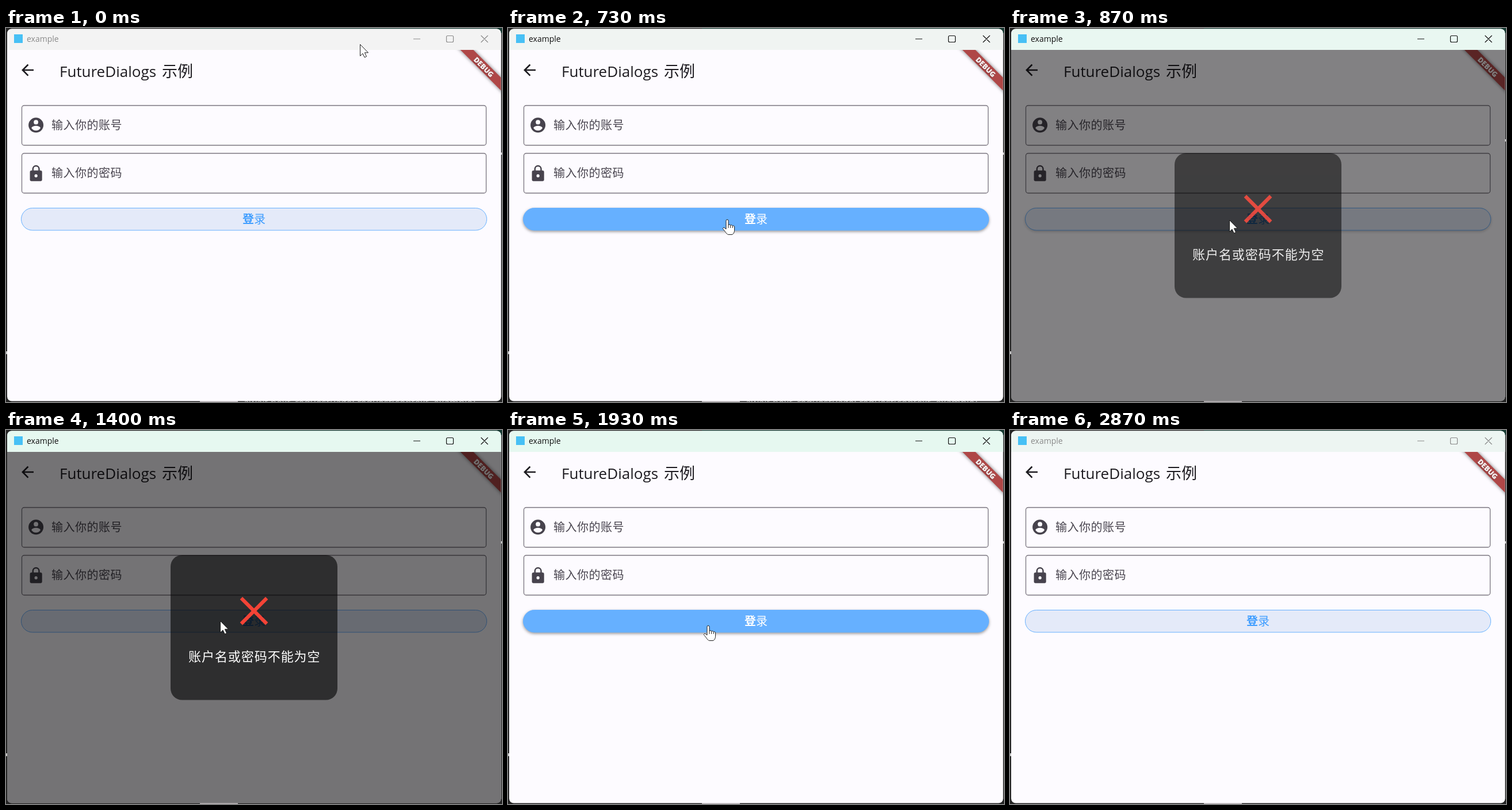
These frames come from a looping animation (862x649 px, 2.94 s). An HTML page:

```html
<!DOCTYPE html>
<html lang="zh-CN">
<head>
<meta charset="utf-8">
<style>
html, body { margin: 0; width: 100%; height: 100%; overflow: hidden; background: #222; }
svg { display: block; width: 862px; height: 649px; }
text { font-family: "Open Sans", "Noto Sans CJK SC", "Noto Sans CJK", sans-serif; }
.cjk { font-family: "Noto Sans CJK SC", "Noto Sans CJK", sans-serif; }
.hint { font-size: 20px; font-weight: 300; letter-spacing: .5px; fill: #49454f; }
.field { fill: none; stroke: #79747e; stroke-width: 1.3; }
.icon { fill: #47434d; fill-rule: evenodd; }
.pointer { fill: #fff; stroke: #1c1c1c; stroke-width: 1; stroke-linejoin: round; }
</style>
</head>
<body>
<svg viewBox="0 0 862 649">
  <defs>
    <clipPath id="frame"><rect x="2" y="1.5" width="858.5" height="646" rx="8"/></clipPath>
    <clipPath id="content"><rect x="2" y="38" width="858.5" height="610"/></clipPath>
  </defs>

  <!-- desktop behind the window -->
  <rect width="862" height="649" fill="#242424"/>
  <path d="M337 0H862V9H337z" fill="#173a32"/>
  <path d="M337 647H403V649H337z" fill="#b5afb3"/>
  <path d="M0 561H2V566H0z" fill="#c9c9c9"/>
  <path id="mark" d="M860 0h2v4h-2z" fill="#c9c9c9"/>
  <text id="behind" x="413" y="656" font-size="17" fill="#aaa" textLength="">await next_requestPage: request(context, example)</text>

  <g clip-path="url(#frame)">
    <rect width="862" height="649" fill="#fdfbff"/>
    <rect id="bar" width="862" height="38"/>
    <rect x="14" y="11" width="15" height="15" fill="#47c0f5"/>
    <g id="caption" fill="none">
      <text id="name" x="36" y="24" font-size="14">example</text>
      <path d="M708 19H720M767.500 13.500H775.500Q777.500 13.500 777.500 15.500V22.500Q777.500 24.500 775.500 24.500H767.500Q765.500 24.500 765.500 22.500V15.500Q765.500 13.500 767.500 13.500zM825.500 13L837.500 25M837.500 13L825.500 25" stroke-width="1.2"/>
    </g>

    <g clip-path="url(#content)">
      <path transform="translate(21.800 57.300) scale(1.31)" fill="#1d1b20" d="M20 11H7.830l5.590-5.590L12 4l-8 8 8 8 1.410-1.410L7.830 13H20v-2z"/>
      <text x="93" y="84.500" font-size="26" fill="#1d1b20">FutureDialogs</text>
      <text class="cjk" x="271" y="85" font-size="27" font-weight="300" fill="#1d1b20">示例</text>

      <rect class="field" x="27.500" y="134.500" width="807" height="69" rx="4"/>
      <path class="icon" transform="translate(36.500 153) scale(1.3)" d="M12 2a10 10 0 1 0 0 20 10 10 0 0 0 0-20zm0 3a3 3 0 1 1 0 6 3 3 0 0 1 0-6zm0 14.200a7.200 7.200 0 0 1-6-3.220c.03-1.990 4-3.080 6-3.080s5.970 1.090 6 3.080a7.200 7.200 0 0 1-6 3.220z"/>
      <text class="cjk hint" x="79" y="176">输入你的账号</text>

      <rect class="field" x="27.500" y="217.500" width="807" height="69" rx="4"/>
      <path class="icon" transform="translate(36.300 236.700) scale(1.32)" d="M18 8h-1V6a5 5 0 0 0-10 0v2H6a2 2 0 0 0-2 2v10a2 2 0 0 0 2 2h12a2 2 0 0 0 2-2V10a2 2 0 0 0-2-2zm-6 9a2 2 0 1 1 0-4 2 2 0 0 1 0 4zM15.100 8H8.900V6a3.100 3.100 0 0 1 6.200 0z"/>
      <text class="cjk hint" x="79" y="259">输入你的密码</text>

      <rect id="button" x="26.500" y="312.500" width="809" height="38.500" rx="19.250"/>
      <text id="label" class="cjk" x="411" y="339" font-size="20" font-weight="700">登<tspan font-weight="500">录</tspan></text>

      <g transform="translate(830.500 67.500) rotate(45)">
        <rect x="-70" y="-8" width="140" height="16" fill="#af4747" style="filter:drop-shadow(0 0 3px #0008)"/>
        <text y="4.600" font-size="12.500" font-weight="800" text-anchor="middle" fill="#fff" style="filter:drop-shadow(0 1px 1px #0006)">DEBUG</text>
      </g>

      <rect id="barrier" width="862" height="649"/>
      <g id="dialog">
        <rect x="286" y="217" width="290" height="251.500" rx="20" fill-opacity=".6"/>
        <path d="M411 294L451 334M451 294L411 334" stroke="#f44336" stroke-width="6.200" stroke-linecap="square"/>
        <text class="cjk" x="317" y="401" font-size="22" font-weight="500" letter-spacing=".95" fill="#fff">账户名或密码不能为空</text>
      </g>
    </g>
  </g>

  <g id="cursor" class="pointer">
    <path id="arrow" d="M.5 .5V20.500L5 16.300 8.200 23 11.500 21.500 8.400 14.800H14.500z"/>
    <path id="hand" d="M-2 1.500a2 2 0 0 1 4 0V9a2 2 0 0 1 3.700 .7a2 2 0 0 1 3.600 1a1.900 1.900 0 0 1 3.300 1.300V17c0 5-2 8-4.500 8.500H1.500C-1 25-5 18-7.500 15.500c-.8-1.600 1.400-2.800 3-1.600L-2 16zM2 9v5M5.700 10v4M9.300 11v3"/>
  </g>
</svg>

<script>
const LOOP = 2940, FPS = 15, LAST = 43;
const FOCUS = 667, OPEN = 768, CLOSE = 1779, LEAVE = 1967, BLUR = 2800;
const $ = id => document.getElementById(id);
const set = (id, attrs) => { for (const k in attrs) $(id).setAttribute(k, attrs[k]); };
const ramp = (t, start, length) => Math.min(1, Math.max(0, (t - start) / length));
const mix = (a, b, k) => `rgb(${a.map((v, i) => v + (b[i] - v) * k)})`;

// time, x, y of the pointer after it has reached the button
const path = [
  [533, 381, 333], [1333, 381, 332], [1400, 372, 331], [1467, 371, 330],
  [1667, 371, 330], [1867, 366, 318], [2000, 330, 362], [2200, 190, 508],
  [2267, 186, 513], [2600, 90, 660], [LOOP, 90, 660]
];

function pointer(t) {
  if (t < 533) {
    const k = 1 - (1 - t / 533) ** 3;
    return [615 - 234 * k, 28 + 305 * k];
  }
  const i = path.findIndex(p => p[0] > t);
  const [t0, x0, y0] = path[i - 1], [t1, x1, y1] = path[i];
  const k = (t - t0) / (t1 - t0);
  return [x0 + (x1 - x0) * k, y0 + (y1 - y0) * k];
}

function draw(t) {
  const active = t >= FOCUS && t < BLUR - 1;
  const tint = ramp(t, FOCUS, 265) - ramp(t, BLUR - 67, 260);
  set('bar', { fill: mix([243, 243, 243], [230, 248, 240], tint) });
  set('name', { fill: active ? '#111' : '#8a8a8a' });
  set('caption', { stroke: 'none' });
  $('caption').querySelector('path').setAttribute('stroke', active ? '#111' : '#8a8a8a');
  set('behind', { visibility: t < OPEN ? 'visible' : 'hidden' });
  set('mark', { transform: `translate(0 ${t < OPEN ? 216 : 193})` });

  const [x, y] = pointer(t);
  const hover = y > 312 && y < 352 && (t < OPEN || t >= CLOSE);
  const lift = ramp(t, 300, 200) - ramp(t, OPEN, 200) + ramp(t, CLOSE, 150) - ramp(t, LEAVE, 200);
  set('button', { fill: hover ? '#66b0ff' : '#e4eaf9', stroke: '#66b0ff' });
  $('button').style.filter = lift > 0 ? `drop-shadow(0 2.500px 2.500px rgba(0,0,0,${.4 * lift}))` : 'none';
  set('label', { fill: hover ? '#fff' : '#409eff' });

  const shown = ramp(t, OPEN, 150) - ramp(t, CLOSE, 150);
  set('barrier', { opacity: .54 * (1 - (1 - shown) ** 2.15) });
  set('dialog', { opacity: Math.sin(shown * Math.PI / 2) });

  set('cursor', { transform: `translate(${Math.round(x)} ${Math.round(y)})` });
  set('arrow', { visibility: hover ? 'hidden' : 'visible' });
  set('hand', { visibility: hover ? 'visible' : 'hidden' });
}

const start = performance.now();
function tick() {
  const t = (performance.now() - start) % LOOP;
  draw(Math.min(LAST, Math.floor((t + 4) * FPS / 1000)) * 1000 / FPS);
  requestAnimationFrame(tick);
}
tick();
</script>
</body>
</html>
```
